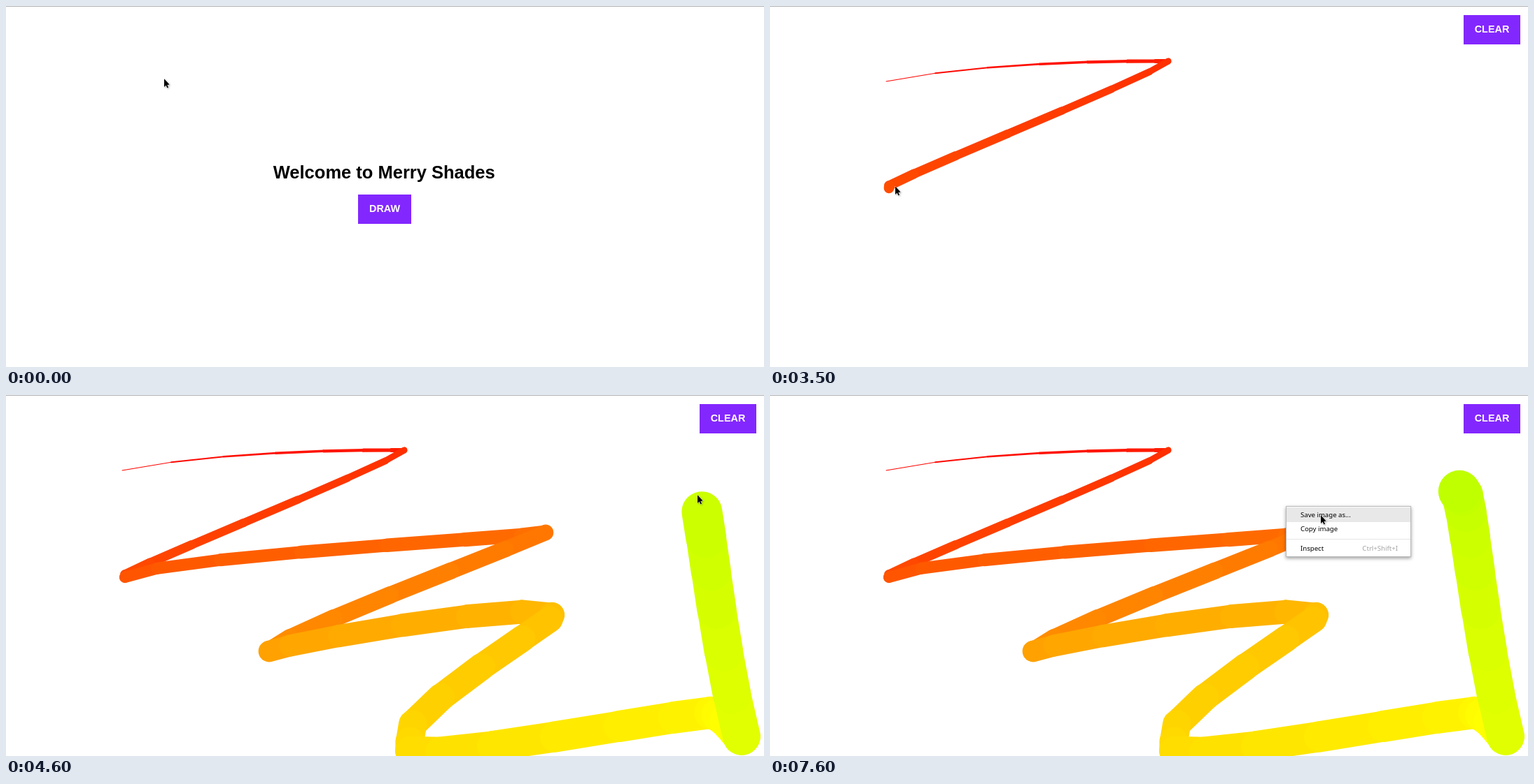
An HTML page with a canvas for the animation above (8000 ms loop, 1083 by 517 pixels).

```html
<!DOCTYPE html>
<html lang="en">
<head>
<meta charset="utf-8">
<title>Drawing page</title>
<style>
  html, body { margin: 0; width: 100%; height: 100%; overflow: hidden; background: #fff; }
  #stage { position: relative; width: 1083px; height: 517px; overflow: hidden; font-family: "Liberation Sans", Arial, sans-serif; }
  #stage > * { position: absolute; }
  [hidden] { display: none !important; }
  canvas { left: 0; top: 0; }
  #rule { left: 0; top: 0; width: 100%; height: 1px; background: #b2b2b2; }
  h1 { left: 0; top: 223px; width: 1080.5px; margin: 0; font-size: 25.5px; line-height: 30px; text-align: center; white-space: nowrap; color: #000; }
  .button { height: 42px; line-height: 41px; font-size: 14.4px; font-weight: bold; text-align: center; color: #fff; background: #8327ff; }
  .button.hover { background: #9040ff; }
  #draw { left: 503px; top: 270px; width: 76px; }
  #clear { left: 991px; top: 13px; width: 81px; }
  #menu { left: 737px; top: 159px; width: 177px; height: 71px; border: 1px solid #b8b8b8; background: #fff; box-shadow: 0 2px 5px rgba(0, 0, 0, .38); font: 9.6px/21px "Noto Sans", sans-serif; color: #000; }
  #menu div { position: absolute; left: 0; right: 0; height: 21px; padding: 0 18px 0 20px; white-space: nowrap; }
  #menu .hover { background: #e8e8e8; }
  #menu span { float: right; color: #a3a3a3; }
  #menu hr { position: absolute; left: 0; right: 0; top: 46px; height: 1px; margin: 0; border: 0; background: #e6e6e6; }
  svg { left: 0; top: 0; overflow: visible; filter: drop-shadow(1px 1px 1px rgba(0, 0, 0, .3)); }
  svg path { fill: #000; stroke: #fff; stroke-width: .9; stroke-linejoin: round; paint-order: stroke; }
</style>
</head>
<body>
<div id="stage">
  <canvas id="paper" width="1083" height="517"></canvas>
  <div id="rule"></div>
  <h1 id="title">Welcome to Merry Shades</h1>
  <div id="draw" class="button">DRAW</div>
  <div id="clear" class="button">CLEAR</div>
  <div id="menu">
    <div id="save" style="top:1px">Save image as...</div>
    <div style="top:21px">Copy image</div>
    <hr>
    <div style="top:49px">Inspect<span>Ctrl+Shift+I</span></div>
  </div>
  <svg id="cursor" width="20" height="20">
    <path id="arrow" d="M0 .3V12L2.6 9.6L4.4 13.4L6 12.6L4.3 8.9L7.6 8.4Z"/>
    <path id="hand" d="M-1.3 1Q0 -1 1.3 1V5L6.5 6.3Q8 7 7.8 9L6.8 14.5H-1L-4.5 9.5Q-4.6 7.6 -3 8L-1.3 9.5Z"/>
  </svg>
</div>
<script>
const LOOP = 8000, STEP = 100;
const DRAW_START = 3300, LAST_LEG = 4500, DRAW_END = 5000;
const LEAD = 1.2; // how many segments the pointer runs ahead of the ink

const byId = id => document.getElementById(id);
const ctx = byId('paper').getContext('2d');
const clamp = (v, lo, hi) => Math.min(hi, Math.max(lo, v));
const mix = (a, b, u) => a.map((v, i) => v + (b[i] - v) * u);

// Point on a cubic curve, by repeated mixing of its control points.
function onCurve(nodes, u) {
  while (nodes.length > 1) nodes = nodes.slice(1).map((p, i) => mix(nodes[i], p, u));
  return nodes[0];
}

// The zigzag, one curve per leg; the pen rests for some segments at each corner.
const points = [[166, 108]];
function leg(steps, rest, ...nodes) {
  const curve = [points[points.length - 1], ...nodes];
  for (let i = 1; i <= steps + rest; i++) points.push(onCurve(curve, Math.min(1, i / steps)));
}
leg(7, 3, [320, 76], [557, 79], [569, 79]);
leg(8, 1, [543, 103], [115, 272], [170, 261]);
leg(7, 1, [212, 231], [762, 203], [771, 197]);
leg(6, 4, [686, 234], [395, 342], [376, 367]);
leg(6, 1, [384, 359], [742, 293], [780, 315]);
leg(6, 0, [823, 300], [537, 467], [577, 496]);
leg(8, 0, [505, 553], [1057, 434], [1017, 458]);
leg(3, 5, [1027, 460], [1047, 489], [1051, 489]);
leg(8, 1, [1011, 333], [996, 129], [985, 138]);
const last = points.length - 1;

// Pointer moves outside drawing.
const moves = [
  { at: 1100, steps: 9, curve: [[226, 104], [330, 700], [1080, 446], [554, 299]] },
  { at: 2000, steps: 3, curve: [[554, 299], [552, 292]] },
  { at: 2400, steps: 9, curve: [[552, 292], [400, 240], [-15, 5], [166, 107]] },
  { at: 5000, steps: 9, curve: [[985, 138], [985, 100], [1000, 40], [1023, 40]] },
  { at: 6200, steps: 5, curve: [[1023, 40], [745, 157], [737, 160], [737, 159]] },
  { at: 7100, steps: 6, curve: [[737, 159], [750, 163], [787, 172], [787, 172]] }
];

const stepsSince = (t, start) => Math.floor((t - start) / STEP) + 1;

function segmentsAt(t) {
  if (t < DRAW_START) return 0;
  if (t < LAST_LEG) return Math.min(65, Math.round(5.9 * stepsSince(t, DRAW_START)));
  return Math.min(last, 66 + 3 * stepsSince(t, LAST_LEG));
}

function pointerAt(t) {
  if (t >= DRAW_START && t < DRAW_END) {
    const n = Math.min(last, segmentsAt(t) + LEAD), i = Math.floor(n);
    return mix(points[i], points[Math.min(last, i + 1)], n - i);
  }
  const move = moves.filter(m => m.at <= t).pop() || moves[0];
  return onCurve(move.curve, clamp(stepsSince(t, move.at) / move.steps, 0, 1));
}

function paint(count) {
  ctx.clearRect(0, 0, 1083, 517);
  ctx.lineCap = ctx.lineJoin = 'round';
  for (let n = 1; n <= count; n++) {
    const [x0, y0] = points[n - 1], [x1, y1] = points[n];
    ctx.strokeStyle = `hsl(${n}, 100%, 50%)`;
    ctx.lineWidth = n * 0.8 + 0.3;
    ctx.beginPath();
    ctx.moveTo(x0, y0);
    ctx.lineTo(x1 + 0.01, y1); // keeps resting steps visible as dots
    ctx.stroke();
  }
}

const inside = (x, y, l, t, r, b) => x >= l && x < r && y >= t && y < b;
const show = (id, on) => { byId(id).hidden = !on; };
const hover = (id, on) => byId(id).classList.toggle('hover', on);
const reveal = (id, on) => { byId(id).style.display = on ? '' : 'none'; };

let painted = -1;
function render(t) {
  const home = t < 2100;
  const [x, y] = pointerAt(t);
  const onDraw = home && inside(x, y, 503, 270, 579, 312);
  const onClear = !home && inside(x, y, 991, 13, 1072, 55);

  show('title', home);
  show('draw', home);
  show('clear', !home);
  show('menu', t >= 6700);
  hover('draw', onDraw);
  hover('clear', onClear || (t >= 6200 && t < 6600));
  hover('save', t >= 7200);

  reveal('hand', onDraw || onClear);
  reveal('arrow', !(onDraw || onClear));
  byId('cursor').style.transform = `translate(${Math.round(x)}px, ${Math.round(y)}px)`;

  const count = segmentsAt(t);
  if (count !== painted) paint(painted = count);
}

const begin = performance.now();
function tick() {
  render((performance.now() - begin) % LOOP);
  requestAnimationFrame(tick);
}
tick();
</script>
</body>
</html>
```
